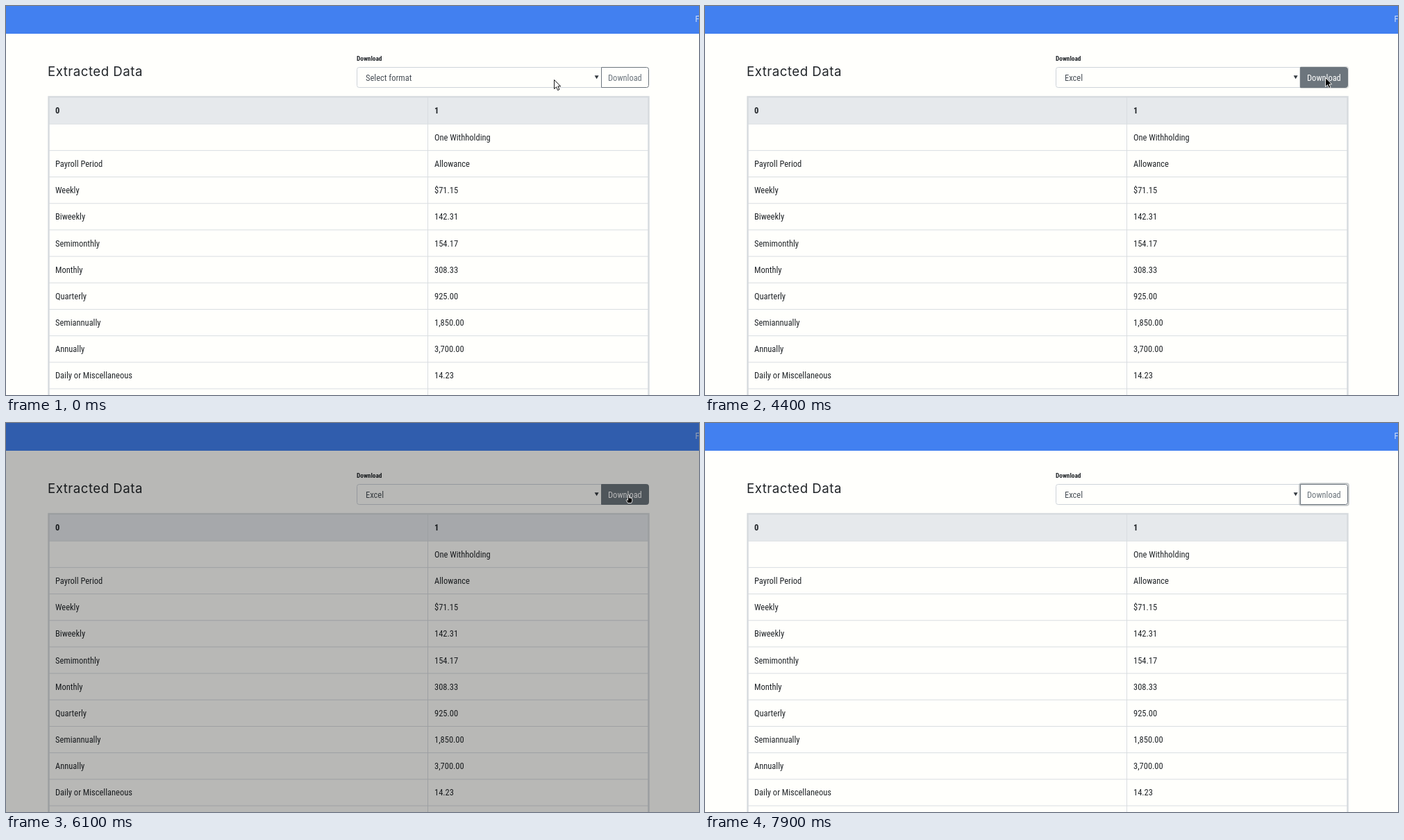
These frames come from a looping animation (998 by 561 pixels, 8 s). An HTML page:

```html
<!DOCTYPE html>
<html lang="en">
<head>
<meta charset="utf-8">
<title>Extracted Data</title>
<style>
  html, body { margin: 0; width: 100%; height: 100%; overflow: hidden; background: #fffffc; }
  svg { display: block; width: 100vw; height: 100vh; }
  text { white-space: pre; }
  .cond { font: condensed 12.47px "Roboto Condensed", Roboto, sans-serif; fill: #212529; }
  .plain { font: 12.47px Roboto, sans-serif; }
  .bold { font-weight: 700; }
  .label { font-size: 9.35px; font-weight: 700; }
  .field { fill: #495057; }
  .muted { fill: #868a8e; }
  .title { font: 18.7px Inter, sans-serif; letter-spacing: .025em; fill: #212529; }
  .ui { font: 10.5px "Noto Sans", sans-serif; fill: #b9bfca; }
  .head { font-weight: 600; font-size: 10.3px; }
  .light { fill: #fff; }
  .icon { fill: none; stroke: #a9afbb; stroke-width: 1.2; }
  .solid { fill: #b4bac5; }
</style>
</head>
<body>
<svg id="stage" viewBox="0 0 998 561"></svg>
<script>
const stage = document.getElementById('stage');
const $ = id => document.getElementById(id);

// Use a real condensed face when there is one, otherwise narrow the regular one.
stage.innerHTML = ['plain', 'cond'].map(c => `<text class="${c}">Daily or Miscellaneous</text>`).join('');
const [plainWidth, condWidth] = [...stage.children].map(el => el.getComputedTextLength());
const narrow = condWidth < plainWidth * .95 ? 1 : .885;

const cond = (x, y, s, cls = '', id = '') =>
  `<text id="${id}" class="cond ${cls}" transform="translate(${x} ${y}) scale(${narrow} 1)">${s}</text>`;
const ui = (x, y, s, cls = '', id = '') => `<text id="${id}" class="ui ${cls}" x="${x}" y="${y}">${s}</text>`;
const rect = (x, y, w, h, fill, more = '') =>
  `<rect x="${x}" y="${y}" width="${w}" height="${h}" fill="${fill}" ${more}/>`;
const path = (d, cls = '', more = '') => `<path d="${d}" class="${cls}" ${more}/>`;
const at = (x, y, body) => `<g transform="translate(${x} ${y})">${body}</g>`;

const rows = [
  ['', 'One Withholding'], ['Payroll Period', 'Allowance'], ['Weekly', '$71.15'], ['Biweekly', '142.31'],
  ['Semimonthly', '154.17'], ['Monthly', '308.33'], ['Quarterly', '925.00'], ['Semiannually', '1,850.00'],
  ['Annually', '3,700.00'], ['Daily or Miscellaneous', '14.23']
];
const rowY = i => 170.2 + i * 38.18;
const options = ['Select format', 'CSV', 'Excel', 'JSON', 'HTML'];
const optionTop = 118.8, optionHeight = 17.1;

const table = rect(61.5, 131, 864, 39, '#e6e9ec') +
  path('M607.5 131V561' + rows.concat(0).map((_, i) => `M61 ${rowY(i)}H926`).join(''), '', 'stroke="#d9dde1" fill="none"') +
  rect(61.5, 131, 864, 450, 'none', 'stroke="#d6dade" stroke-width="2.4"') +
  cond(71, 155, '0', 'bold') + cond(617, 155, '1', 'bold') +
  rows.map(([a, b], i) => cond(71, rowY(i) + 23.6, a) + cond(617, rowY(i) + 23.6, b)).join('');

const page = rect(0, 0, 998, 561, '#fffffc') + rect(0, 0, 998, 40, '#4280f0') +
  cond(992.6, 22.5, 'F', '', 'nav') +
  '<text class="title" x="60" y="100.5">Extracted Data</text>' +
  cond(505, 79, 'Download', 'label') + table +
  path('M857.5 88.5H508.5q-3 0 -3 3V114.500q0 3 3 3H857.5', '', 'id="select" fill="#fffffc"') +
  cond(518, 108, '', 'field', 'chosen') +
  path('M847.6 100.300h6l-3 5z', '', 'fill="#343a40"') +
  rect(0, 0, 0, 0, 'none', 'id="ring" stroke="#6c757d"') +
  path('M857.5 88.500h65q3 0 3 3v23q0 3 -3 3h-65z', '', 'id="button" stroke="#6c757d"') +
  cond(867, 107.5, 'Download', '', 'buttonText');

const popup = '<g id="popup">' +
  rect(505.5, 118.5, 352, 86, '#fffffc', 'stroke="#7484ae" style="filter:drop-shadow(0 2px 2px #0005)"') +
  rect(506, 0, 351, optionHeight, '#466af2', 'id="highlight"') +
  options.map((s, i) => cond(518.5, optionTop + i * optionHeight + 13, s, i ? 'field' : 'muted', 'option' + i)).join('') +
  '</g>';

const house = path('M-5.500 .5L0 -5L5.500 .5M-4 0V5H-1.200V1.500H1.200V5H4V0', 'icon');
const places = [
  ['Home', 46, house],
  ['Documents', 71, path('M-4 -5.500H1.500L4 -3V5.500H-4ZM1 -5V-2.500H4', 'icon')],
  ['Downloads', 96, path('M0 -5.500V2M-3 -1L0 2.200L3 -1M-5 2V5H5V2', 'icon')],
  ['Music', 121, path('M-2.500 3.500V-4.500H4V2.500', 'icon') + path('M-5.500 3.500a1.700 1.700 0 1 0 3.400 0a1.700 1.700 0 1 0 -3.400 0M1 2.500a1.700 1.700 0 1 0 3.400 0a1.700 1.700 0 1 0 -3.400 0', 'solid')],
  ['Pictures', 146, path('M-5.500 -3H-2.500L-1.500 -5H1.500L2.500 -3H5.500V4.500H-5.500ZM-2 .7a2 2 0 1 0 4 0a2 2 0 1 0 -4 0', 'icon')],
  ['Videos', 171, path('M-2 -4H5V4H-2ZM-2.500 0L-5.500 -3V3Z', 'solid')],
  ['Other Locations', 203, path('M-4.500 0H4.500M0 -4.500V4.500', 'icon')]
];

const edge = 'stroke="#2b2e39"';
const dialog = '<g id="dialog">' +
  rect(133, -8, 732, 577, '#383c4a', 'style="filter:drop-shadow(0 0 2.5px #0009)"') +
  rect(133, 28, 121.5, 501, '#353945') + rect(254.5, 63, 610.5, 466, '#404552') +
  rect(843, 63, 22, 466, '#3b404c') + rect(133, 0, 732, 28, '#2f343f') +
  rect(133, 529, 732, 32, '#353945') +
  path('M133 28.500H865M254.500 28V529M254.500 63H865M133 529.500H865M133.500 0V561M864.500 0V561', '', edge + ' fill="none"') +
  ui(149, 17.8, 'Cancel') + ui(332, 17.8, 'Name') +
  rect(372, 4, 293, 20, '#5294dc') + rect(377.5, 6, 35.7, 16, '#fff') +
  `<text class="ui" x="378" y="18" style="font-size:11px;fill:#5294dc">us-007<tspan fill="#fff">.zip</tspan></text>` +
  path('M782.500 12.500a3.300 3.300 0 1 0 6.600 0a3.300 3.300 0 1 0 -6.600 0M788.200 15L791.500 18.500', 'icon', 'style="stroke-width:1.8"') +
  rect(806, 3, 52, 21, '#5294e2', 'id="saveFill" rx="2"') + ui(820, 17.8, 'Save', '', 'save') +
  places.map(([s, y, icon]) => at(147, y, icon) + ui(160, y + 3.8, s)).join('') +
  rect(260.5, 37, 216, 20, '#444a58', edge + ' rx="2"') + rect(383, 37, 73, 20, '#5294e2') +
  path('M281.500 37V57M341.500 37V57', '', 'stroke="#3d424f"') +
  path('M272 43.300V50.700L268 47Z', 'solid') + path('M465 43.300V50.700L469 47Z', '', 'fill="#7d8390"') +
  at(291, 47, house) + ui(300, 50.5, 'tarnel') + ui(352, 50.5, 'dev') + ui(395, 50.5, 'download', 'light') +
  rect(834.5, 37, 25, 20, '#444a58', edge + ' rx="2"') +
  path('M848 51.500H841.500V42.500H845L846.500 44H852.500V47M851 47.500V54M847.800 50.700H854.200', 'icon') +
  ui(260, 77, 'Name', 'head') + ui(734, 77, 'Size', 'head') + ui(778, 77, 'Modified', 'head') +
  path('M828 75H836L832 70.500Z', 'solid') + path('M728.500 66V80M772.500 66V80', '', 'stroke="#353945"') +
  rect(262, 88, 11, 12, '#dfb662', 'rx="1"') + rect(262, 88, 11, 3.5, '#c99a4c') + rect(266, 87, 3, 6, '#f3e3bd') +
  ui(280, 97, 'old.zip') + ui(735, 97, '5.4 kB') + ui(779, 97, '23:40') +
  rect(791.5, 535.5, 67, 21, '#444a58', edge + ' rx="2"') + path('M834.500 536V556', '', 'stroke="#3d424f"') +
  ui(800, 550, '*.zip') + path('M842 544H851L846.500 549Z', 'solid') + '</g>';

const arrow = 'M.5 .5V13.500L3.500 10.700L5.600 15.500L7.900 14.500L5.800 9.800H9.700Z';
const hand = 'M2.500 1.200q1 -1 2 0V5H7q1.800 .3 1.800 2V9.500L7.600 12.500H2.500L.3 8.700q.2 -1.300 1.100 -1L2.500 8.500Z';

stage.innerHTML = page + popup + rect(0, 0, 998, 561, '#000', 'id="shade"') +
  path(arrow, '', 'id="cursor" stroke-width=".9" stroke-linejoin="round"') + dialog;
$('nav').style.fill = '#ffffffc0';

// Pointer stops: time, x, y
const stops = [
  [1400, 789, 106], [1500, 788, 111], [1800, 771, 139], [2000, 766, 186], [2300, 763, 159],
  [3000, 763, 159], [3100, 773, 159], [3200, 773, 159], [3600, 890, 108], [3700, 890, 108],
  [3800, 893, 103], [6400, 893, 103], [7000, 471, 16]
];
function pointer(t) {
  const i = stops.findIndex(s => s[0] >= t);
  if (i < 1) return stops.at(i).slice(1);
  const [a, b] = [stops[i - 1], stops[i]];
  const k = (t - a[0]) / (b[0] - a[0]);
  return [a[1] + (b[1] - a[1]) * k, a[2] + (b[2] - a[2]) * k];
}

const set = (id, attrs) => { for (const k in attrs) $(id).setAttribute(k, attrs[k]); };
const show = (id, on) => { $(id).style.display = on ? '' : 'none'; };

function focusRing(t) {
  if (t >= 4300 && t < 4500) return (t - 4200) / 200;
  if (t >= 7900) return 1.8;
  return t >= 6200 ? Math.min(3, (t - 6100) / 60) : 0;
}

function render(t) {
  const [x, y] = pointer(t);
  const visible = t < 7100;
  const hover = visible && x > 857 && y > 88 && y < 118;
  const open = t >= 1100 && t < 2900;
  const active = open ? Math.floor((y - optionTop) / optionHeight) : 0;

  $('chosen').textContent = options[t < 2900 ? 0 : 2];
  set('select', { stroke: t < 1100 || t >= 4400 ? '#ced4da' : t < 1200 ? '#b4cbe8' : '#94bcf0' });
  show('popup', open);
  show('highlight', active > 0);
  set('highlight', { y: optionTop + active * optionHeight });
  options.forEach((_, i) => { $('option' + i).style.fill = i && i === active ? '#fff' : ''; });

  set('button', { fill: hover ? '#6c757d' : '#fffffc' });
  $('buttonText').style.fill = hover ? '#fff' : '#6c757d';
  const r = focusRing(t);
  set('ring', {
    x: 857 - r / 2, y: 88 - r / 2, width: 69 + r, height: 30 + r, rx: 2 + r / 2,
    'stroke-width': r, 'stroke-opacity': r / 6 + .1
  });

  set('shade', { opacity: Math.max(0, Math.min(.31, (t - 4460) * .00058, (6300 - t) * .0014)) });
  show('dialog', t >= 4500 && t < 6100);
  show('saveFill', t >= 5900);
  $('save').style.fill = t >= 5900 ? '#fff' : '';

  const light = t < 500;
  show('cursor', visible);
  set('cursor', {
    d: t >= 4500 && t < 6500 ? hand : arrow, transform: `translate(${x} ${y})`,
    fill: light ? '#fff' : '#000', stroke: light ? '#000' : '#fff'
  });
}

const start = performance.now();
function tick() {
  render(Math.floor((performance.now() - start) % 8000 / 100) * 100);
  requestAnimationFrame(tick);
}
tick();
</script>
</body>
</html>
```
